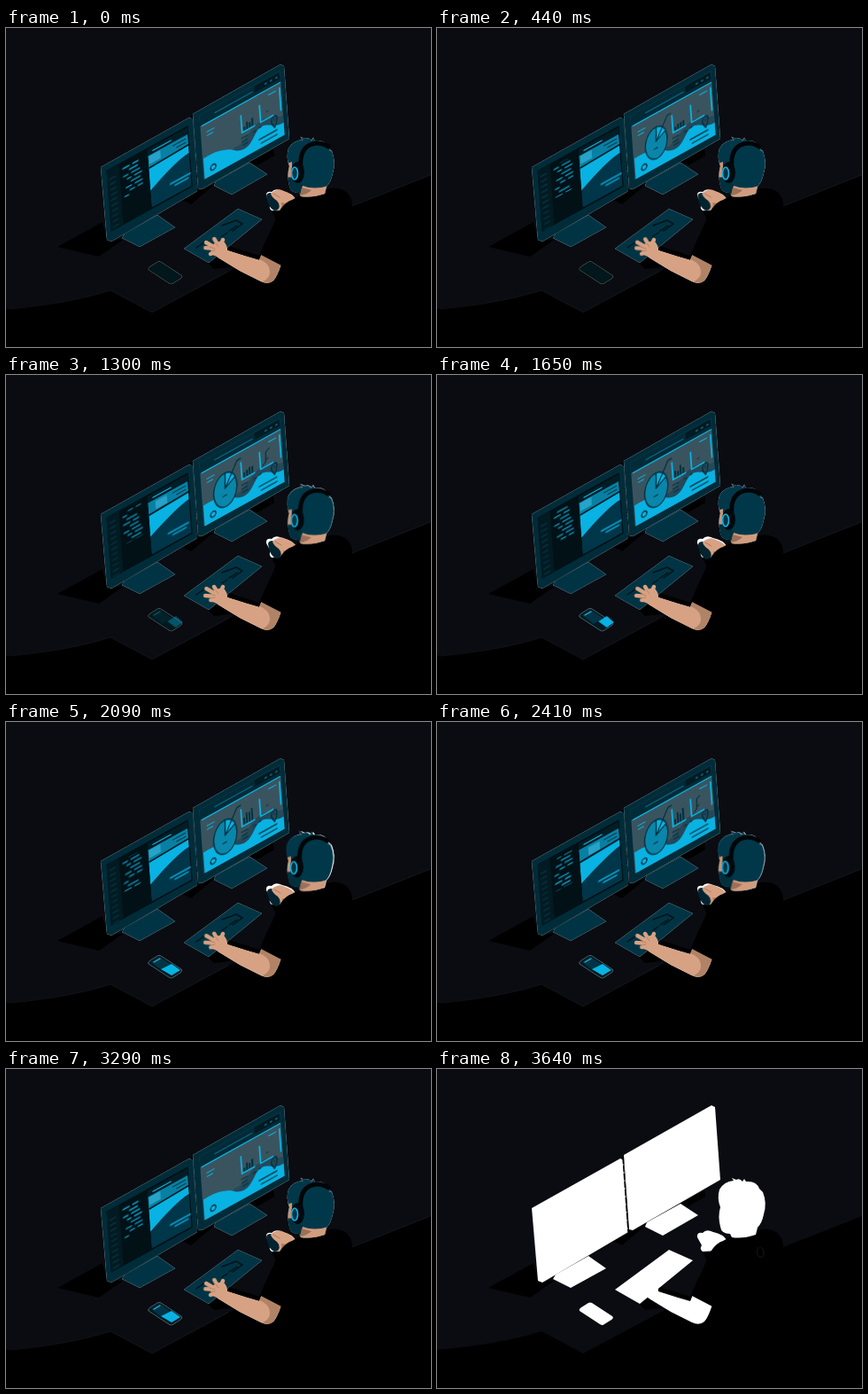
These frames come from a looping animation (480x360 px, 4810 ms). An HTML page:

```html
<!DOCTYPE html>
<html lang="en">
<head>
<meta charset="utf-8">
<title>Night desk</title>
<style>
html, body { margin: 0; width: 100%; height: 100%; overflow: hidden; background: #0a0c11; }
svg { display: block; width: 100%; height: 100%; }
svg * { animation-duration: 4.81s; animation-iteration-count: infinite; animation-timing-function: ease-in-out; }
.line { fill: none; stroke-linecap: round; stroke-linejoin: round; }
.lit { stroke: #08b2e2; }
.ink { stroke: #00303f; }
.art { animation-name: fade; animation-timing-function: linear; }
.trace { opacity: 0; animation-name: trace; animation-timing-function: linear; }
.code { animation-name: code; animation-timing-function: steps(30); }
.ticks { animation-name: ticks; animation-timing-function: linear; }
.card { animation-name: card; }
.wave { animation-name: wave; }
.copy { animation-name: copy; }
.pie { transform-origin: 33px 51px; animation-name: pie; }
.plot { stroke-dasharray: 30; stroke-dashoffset: 30; animation-name: plot; }
.bar { transform-origin: 0 49px; animation-name: barA; }
.bar.b { animation-name: barB; }
.head { transform-origin: 345px 188px; animation-name: nod; }
.palm { animation-name: palm; }
.finger { animation-name: tap; animation-duration: .37s; }
.finger.b { animation-delay: -.19s; }
.phone { animation-name: phone; }
.block { transform-origin: 186px 280px; animation-name: block; }

@keyframes fade {
  0%, 69.13% { opacity: 1; animation-timing-function: steps(9); }
  75.68%, 100% { opacity: 0; }
}
@keyframes trace {
  0%, 69.13% { opacity: 0; animation-timing-function: steps(9); }
  75.68%, 100% { opacity: 1; }
}
@keyframes code {
  0%, .6% { transform: translateY(0); }
  68.4%, 100% { transform: translateY(-81px); }
}
@keyframes ticks {
  0%, .6% { transform: translateY(0); }
  68.4%, 100% { transform: translateY(-24px); }
}
@keyframes card {
  0%, 8%, 30%, 45%, 66%, 100% { transform: none; }
  17%, 24%, 54%, 58% { transform: translate(15px, 3px); }
}
@keyframes wave {
  0%, 8%, 30%, 45%, 66%, 100% { d: path("M52 30 L97 29 L97 37 C85 38 72 44 52 55 Z"); }
  17%, 24%, 54%, 58% { d: path("M52 32 L97 30 L97 35 C85 38 70 45 52 53 Z"); }
}
@keyframes copy {
  0%, 8%, 30%, 45%, 66%, 100% { transform: none; }
  17%, 24%, 54%, 58% { transform: translate(-5px, 3px); }
}
@keyframes pie {
  0%, .6% { transform: scale(0); }
  11%, 57.5% { transform: scale(1); }
  67%, 100% { transform: scale(0); }
}
@keyframes plot {
  0%, 12%, 33%, 45%, 66%, 100% { stroke-dashoffset: 30; visibility: hidden; }
  12.1%, 32.9%, 45.1%, 65.9% { stroke-dashoffset: 30; visibility: visible; }
  19%, 25%, 54%, 58% { stroke-dashoffset: 0; visibility: visible; }
}
@keyframes barA {
  0%, .6%, 20%, 68.4%, 100% { transform: scaleY(1); }
  34%, 44% { transform: scaleY(1.8); }
  56.5% { transform: scaleY(1.1); }
}
@keyframes barB {
  0%, .6%, 20%, 68.4%, 100% { transform: scaleY(1); }
  10%, 34% { transform: scaleY(.7); }
  44%, 56.5% { transform: scaleY(1.5); }
}
@keyframes nod {
  0%, 8%, 34.3%, 56.5%, 100% { transform: none; }
  19.75% { transform: translate(-.3px, .5px) rotate(-.5deg); }
  43.45% { transform: translate(-.6px, .2px) rotate(-.9deg); }
}
@keyframes palm {
  0%, 6%, 56%, 100% { transform: none; }
  19.75% { transform: translate(3px, 0); }
  34.3%, 44% { transform: translate(1px, 2px); }
}
@keyframes tap {
  0%, 100% { transform: none; }
  50% { transform: translate(.3px, -1px); }
}
@keyframes phone {
  0%, 24% { opacity: 0; }
  31%, 100% { opacity: 1; }
}
@keyframes block {
  0%, 34.3% { transform: translate(5px, -1px) scaleX(.8); }
  41%, 100% { transform: none; }
}
</style>
</head>
<body>
<svg viewBox="0 0 480 360" preserveAspectRatio="none">
<defs>
  <path id="left" d="M107 157 L207 101 L211 103 L216 184 L119 241 L114 239 Z"/>
  <path id="right" d="M211 97 L310 41 L314 43 L320 125 L221 182 L217 181 Z"/>
  <path id="standL" d="M131 237 L151 247 L191 225 L171 211 L134 232 Z"/>
  <path id="standR" d="M235 178 L255 188 L295 165 L275 152 L237 173 Z"/>
  <path id="keys" d="M201 249 L262 204 L289 216 L229 265 Z"/>
  <path id="cell" d="M161 273 Q160 271 163 269 L171 264 Q173 263 175 264 L198 279 Q200 281 197 283 L189 288 Q187 290 184 288 Z"/>
  <path id="arm" d="M232 246 Q238 240 246 241 Q250 245 250 251 L272 258 L286 262 L290 252 L311 266 Q306 281 302 285 Q296 290 288 286 L264 274 L241 260 Q236 256 231 256 Z"/>
  <path id="hand" d="M294 190 Q293 184 300 185 Q304 180 312 184 Q323 186 328 194 L318 204 Q309 206 300 206 Q296 203 299 199 Z"/>
  <path id="skull" d="M319 136 Q324 127 335 126 L333 123 L338 125 Q342 123 345 127 L347 124 L349 127 Q361 126 364 135 L368 139 Q373 151 369 164 Q367 174 362 179 L360 187 Q345 192 333 190 L331 186 Q321 186 320 178 Q317 166 320 156 Q316 146 319 136 Z"/>
  <clipPath id="codeBox"><path d="M20 12 H51 V47 H20 Z"/></clipPath>
  <clipPath id="tickBox"><path d="M8 14 H19 V75 H8 Z"/></clipPath>
  <clipPath id="view"><path d="M52 9 H97 V74 H52 Z"/></clipPath>
  <clipPath id="headBox"><use href="#skull"/></clipPath>
</defs>

<path d="M0 0 H480 V360 H0 Z" fill="#0a0c11"/>
<path d="M0 317 Q70 311 118 296 L165 321 L391 201 L480 166 V360 H0 Z"/>
<path class="line art" d="M4 317 Q70 311 118 296 L165 321 L250 275 M391 201 L479 166" stroke="#22262b" stroke-width=".5" stroke-dasharray="3 1"/>
<path d="M58 247 L109 219 L114 239 L132 239 L105 258 Z M171 211 L217 184 L235 177 L209 199 L199 194 L180 206 Z M275 151 L302 137 L303 144 L284 155 Z M226 263 L235 272 L252 270 L262 259 L252 247 Z M300 207 L310 207 L305 216 Z"/>

<g fill="#fff">
  <use href="#left"/><use href="#right"/><use href="#standL"/><use href="#standR"/>
  <use href="#keys"/><use href="#cell"/><use href="#hand"/><use href="#arm"/>
</g>
<path class="line" d="M210 100 L216 184" stroke="#000" stroke-width="1.5" stroke-dasharray="7 2"/>

<g class="art">
  <g fill="#003444" stroke="#33484f" stroke-width=".4" stroke-dasharray="3 1">
    <use href="#standL"/><use href="#standR"/>
    <use href="#left" fill="#002c3a"/><use href="#right" fill="#002c3a"/>
    <use href="#keys"/>
    <use href="#cell" fill="#02171b"/>
  </g>

  <g transform="matrix(1 -.55 .075 1 107 157)">
    <path d="M6 7 H98 V76 H6 Z" fill="#021116"/>
    <path d="M6 7 H20 V76 H6 Z" fill="#021a21"/>
    <g clip-path="url(#tickBox)"><g class="ticks">
      <path class="line" d="M12 18 V102" stroke="#06394a" stroke-width="7" stroke-dasharray="1.2 4.8" style="stroke-linecap:butt"/>
    </g></g>
    <g clip-path="url(#codeBox)"><g class="code" id="code" stroke-width="1.3"></g></g>
    <g clip-path="url(#view)">
      <path d="M52 9 H97 V76 H52 Z" fill="#00364a"/>
      <path d="M52 16 H97 V30 H52 Z" fill="#0780a4"/>
      <path d="M52 9 H97 V16 H52 Z" fill="#021d26"/>
      <path class="line lit" d="M58 13 H78" stroke-width="1.4"/>
      <path class="line ink" d="M80 20 H94 M84 24 H94" stroke-width="1.1"/>
      <path class="card" d="M53 17 H66 V26 H53 Z" fill="#27a3c9"/>
      <path class="wave" d="M52 30 L97 29 L97 37 C85 38 72 44 52 55 Z" fill="#08b2e2"/>
      <path d="M52 30 L97 28" stroke="#021d26" stroke-width="1.8"/>
      <g class="copy line lit" stroke-width="1.3"><path d="M74 60 H97 M79 64 H94"/></g>
    </g>
  </g>

  <g transform="matrix(1 -.555 .072 1 211 97)">
    <path d="M7 6 H98 V78 H7 Z" fill="#3a545f"/>
    <path d="M7 6 H98 V18 H7 Z" fill="#022b38"/>
    <path class="line" d="M24 12 H66" stroke="#0a6884" stroke-width="1.2"/>
    <path d="M69 7 H97 V14 H69 Z" fill="#021a22"/>
    <path class="line" d="M81 11 H95" stroke="#0c5f78" stroke-width="2" stroke-dasharray="1 5"/>
    <path class="line lit" d="M9 18.5 H97" stroke-width="1.4"/>
    <path d="M42 61 C54 66 62 48 74 48 C84 48 89 55 98 56 V78 H42 Z" fill="#24495a"/>
    <path d="M8 55 C20 53 30 57 38 61 C46 68 52 71 58 68 C65 64 67 54 75 55 C84 57 88 65 98 64 V78 H8 Z" fill="#08b2e2"/>
    <g class="line lit" stroke-width="1.7">
      <path d="M52 31 V50 H66 M73 31 V50 H87 M96 24 V49"/>
      <path d="M14 28 H22 M14 32 H20 M84 25 H92" stroke-width="1.1"/>
    </g>
    <g fill="#00303f">
      <path class="bar" d="M54 49 V45 H56 V49 Z"/><path class="bar b" d="M57 49 V41 H59 V49 Z"/>
      <path class="bar" d="M60 49 V43 H62 V49 Z"/><path class="bar b" d="M63 49 V40 H65 V49 Z"/>
    </g>
    <path class="line ink plot" d="M76 47 L79 45 L80 34 L84 32" stroke-width="1.3"/>
    <g class="line ink" stroke-width="1.4">
      <path d="M70 68 H90 M72 73 H90"/>
      <path d="M51 56 H58 M51 60 H57 M52 64 H58 M64 56 H67 M71 55 H73 M80 42 H82" stroke-width="1.2"/>
      <circle cx="18" cy="70" r="3"/>
      <path d="M88 64 C85 59 84 56 85 54 C87 50 91 51 91 55 C91 58 90 61 88 64 M88 55 V56"/>
    </g>
    <g class="pie ink" stroke-width="1.4" stroke-linejoin="round">
      <ellipse cx="33" cy="51" rx="13" ry="18.5" fill="#0a86ab"/>
      <path d="M33 49 L34 32.5 Q41 33 45 42 Z" fill="#08b2e2"/>
      <path class="line" d="M33 49 L48 26 H52 M30 57 H34"/>
    </g>
  </g>

  <path class="line" d="M244 223 L260 217 L267 221 L256 229 M252 229 L261 223 M244 235 L250 231 M215 248 L225 241" stroke="#021318" stroke-width="1.5"/>

  <g class="phone">
    <use href="#cell" fill="#021a22" stroke="#8fa4ab" stroke-width=".4"/>
    <path d="M164 271 L173 265 L187 274 L177 281 Z" fill="#023446"/>
    <path class="line" d="M167 271 L174 267" stroke="#25b0d8" stroke-width="1.3"/>
    <path class="block" d="M175 279 L187 273 L197 280 L187 286 Z" fill="#08b2e2"/>
  </g>

  <g class="palm">
    <path d="M294 190 Q294 186 299 186 Q306 188 310 197 Q310 206 303 206 Q296 203 294 190 Z" fill="#022430"/>
    <path d="M299 187 Q301 184 305 183 Q309 181 314 184 Q323 187 328 194 L318 204 Q313 208 308 205 Q310 199 306 195 Q300 191 299 187 Z" fill="#d7a283"/>
    <path d="M318 204 Q313 207 309 205 Q312 202 311 197 Q318 199 326 196 Z" fill="#a9795f"/>
    <path class="line" d="M302 187 L309 191" stroke="#a9795f" stroke-width=".9"/>
  </g>

  <use href="#arm" fill="#d7a283"/>
  <path d="M286 261 L290 252 L311 266 Q306 281 302 285 Q297 290 290 286 Q302 280 296 268 Q292 263 286 261 Z" fill="#b08367"/>
  <g class="line" stroke="#d7a283" stroke-width="4.4">
    <path d="M241 247 L245 239 M240 253 L244 249"/>
    <path class="finger" d="M226 242 L238 249 M231 255 L240 251"/>
    <path class="finger b" d="M235 239 L241 249 M225 249 L238 250"/>
  </g>
  <path class="line" d="M230 247 L236 249 M231 252 L236 251 M237 243 L240 247" stroke="#a9795f" stroke-width=".7"/>
</g>

<path d="M332 189 Q350 190 362 182 Q379 178 387 188 Q391 193 391 201 L394 205 L311 268 L288 256 L286 261 L251 250 L252 246 L286 257 Q293 240 302 222 Q310 198 323 194 Z"/>
<path class="line trace" d="M363 201 Q359 207 364 212 Q370 214 369 206 Q368 202 366 201" stroke="#16191e" stroke-width="1"/>

<use href="#skull" fill="#fff"/>
<g class="art"><g class="head">
  <use href="#skull" fill="#00384a"/>
  <g clip-path="url(#headBox)">
    <path d="M317 153 L323 151 V168 L318 170 Z" fill="#c99375"/>
    <path d="M317 168 Q326 168 336 178 L333 188 H317 Z" fill="#002f3e"/>
    <path d="M335 178 Q348 183 364 178 V193 H330 L333 186 Z" fill="#d19c7e"/>
    <path d="M334 180 L345 183 Q340 188 332 189 Z" fill="#9b7059"/>
  </g>
  <path class="line" d="M333 158 Q331 138 343 132 Q354 127 364 134" stroke="#010507" stroke-width="5"/>
  <ellipse cx="329.5" cy="163" rx="7.5" ry="12" fill="#01090d"/>
  <ellipse cx="326" cy="164" rx="3.5" ry="7" fill="#003445" stroke="#08b2e2" stroke-width="1.7"/>
  <path class="line" d="M335 127 L333 123 M345 127 L347 124 M365 138 L368 139" stroke="#84949a" stroke-width=".6"/>
</g></g>
</svg>
<script>
// Repeating block of code rows: [indent, length, length of second word]
const rows = [[4, 7, 6], [11, 9, 0], [4, 5, 9], [8, 4, 8], [12, 10, 0], [6, 6, 8], [10, 5, 5], [4, 4, 0], [8, 11, 0]];
let marks = '';
for (let i = 0; i < 28; i++) {
  const [x, a, b] = rows[i % rows.length], y = 15 + i * 4.5;
  marks += `<path class="line lit" d="M${20 + x} ${y} h${a}${b ? ` m4 0 h${b}` : ''}"/>`;
}
document.getElementById('code').innerHTML = marks;
</script>
</body>
</html>
```
